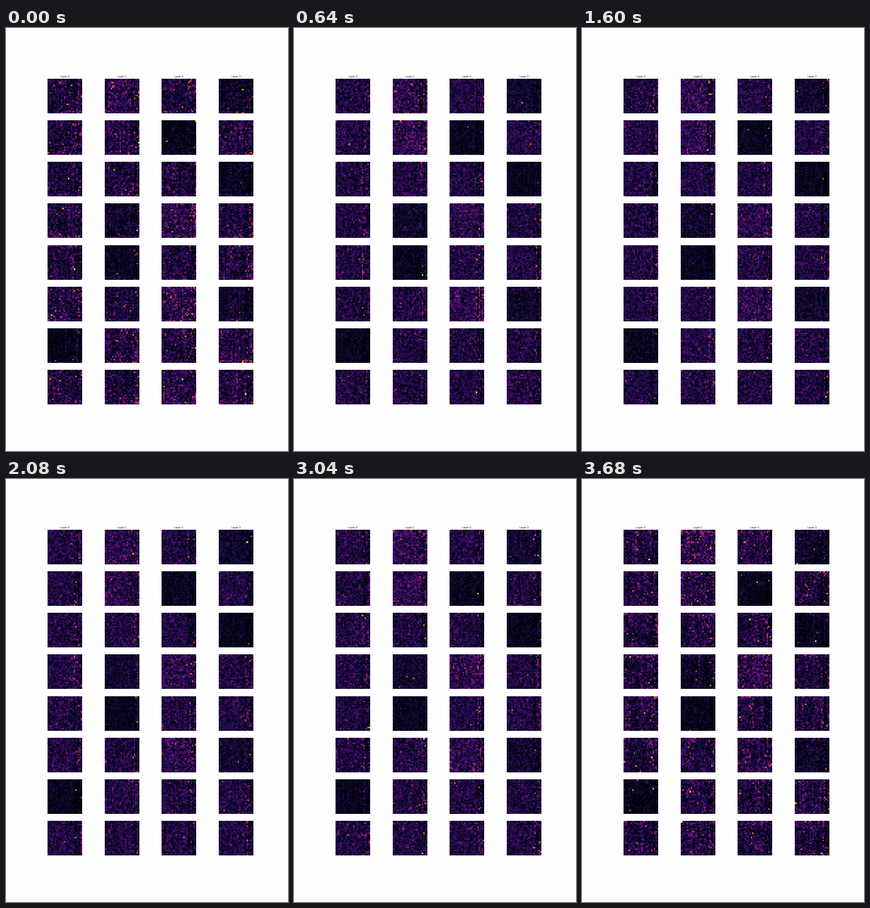
A matplotlib script for the animation above (3840 ms loop, 611 px wide and 917 px high).

```python
import numpy as np
import matplotlib.pyplot as plt
from matplotlib.animation import FuncAnimation

WIDTH, HEIGHT, DPI = 611, 917, 64
HEADS, LAYERS, CELLS = 8, 4, 24
FRAMES, INTERVAL = 24, 160

# Panel layout in pixels, measured from the top left.
LEFT, TOP, SIDE = 90.3, 110.04, 75
STEP_X, STEP_Y = 123.53, 90.13

# Heads that stand out, as (layer, head); the rest share one level.
QUIET = {(2, 1), (3, 2), (1, 4), (0, 6)}
DIM = {(3, 0), (1, 3), (3, 5)}
BRIGHT = {(1, 0), (1, 1), (2, 3), (2, 5)}

ROW, COL = np.mgrid[:CELLS, :CELLS]
TAIL = COL >= 18
# Cell under each panel pixel.
PIXEL_CELL = np.arange(SIDE) * CELLS // SIDE


def mean_weight(layer, head):
    key = layer, head
    if key in QUIET:
        return .058
    if key in DIM:
        return .085
    return .16 if key in BRIGHT else .125


def restlessness(step):
    """Contrast is highest at both ends of the loop."""
    return np.exp(-step / 2) + np.exp((step - FRAMES + 1) / 1.5)


def soft_waves(rng):
    """Broad patches of light and dark."""
    waves = 0
    for _ in range(3):
        kx, ky = rng.normal(0, .25, 2)
        waves = waves + np.cos(kx * COL + ky * ROW + rng.uniform(0, 2 * np.pi))
    return waves


def attention(step, layer, head):
    rng = np.random.default_rng([step, layer, head])
    wild = restlessness(step)
    mean = mean_weight(layer, head)

    shape = np.where(TAIL, 2.2, 3.6) / (1 + .35 * wild)
    weights = mean * rng.gamma(shape) / shape

    # Late columns form uneven, slightly darker stripes.
    spread = np.where(TAIL[0], .3, .05 + .1 * wild)
    weights *= np.exp(spread * rng.normal(-.6, 1, CELLS))
    weights *= np.exp(.1 * wild * soft_waves(rng))

    # Restless steps lean towards the edge of the panel.
    if wild > .5:
        edge = ROW >= CELLS - 2 if step < FRAMES / 2 else ROW < 2
        weights *= 1 + .35 * wild * edge

    weights = np.minimum(weights, .5)
    chance = np.where(TAIL, .012, .001) + .006 * wild
    flares = rng.random(weights.shape) < chance * mean / .125
    weights[flares] = rng.uniform(.4, .72, flares.sum())

    # A few panels hold one outstanding cell.
    if rng.random() < .15 + .4 * wild:
        row = rng.integers(CELLS)
        col = rng.integers(0 if wild > .5 else 18, CELLS)
        weights[row, col] = rng.uniform(.75, 1)
    return weights


def panel(step, layer, head):
    return attention(step, layer, head)[np.ix_(PIXEL_CELL, PIXEL_CELL)]


fig = plt.figure(figsize=(WIDTH / DPI, HEIGHT / DPI), dpi=DPI, facecolor="#fefefe")
images = {}
for layer in range(LAYERS):
    x = LEFT + STEP_X * layer
    fig.text((x + SIDE / 2) / WIDTH, 1 - (TOP - 2.55) / HEIGHT, f"Layer {layer}",
             family="DejaVu Sans", fontsize=5.1 * 72 / DPI,
             ha="center", va="baseline")
    for head in range(HEADS):
        bottom = HEIGHT - round(TOP + STEP_Y * head) - SIDE
        images[layer, head] = fig.figimage(panel(0, layer, head), round(x), bottom,
                                           cmap="inferno", vmin=0, vmax=1,
                                           origin="upper")


def update(step):
    for (layer, head), image in images.items():
        image.set_data(panel(step, layer, head))
    return list(images.values())


anim = FuncAnimation(fig, update, frames=FRAMES, interval=INTERVAL,
                     repeat=True, repeat_delay=0, blit=False)
plt.show()
```
